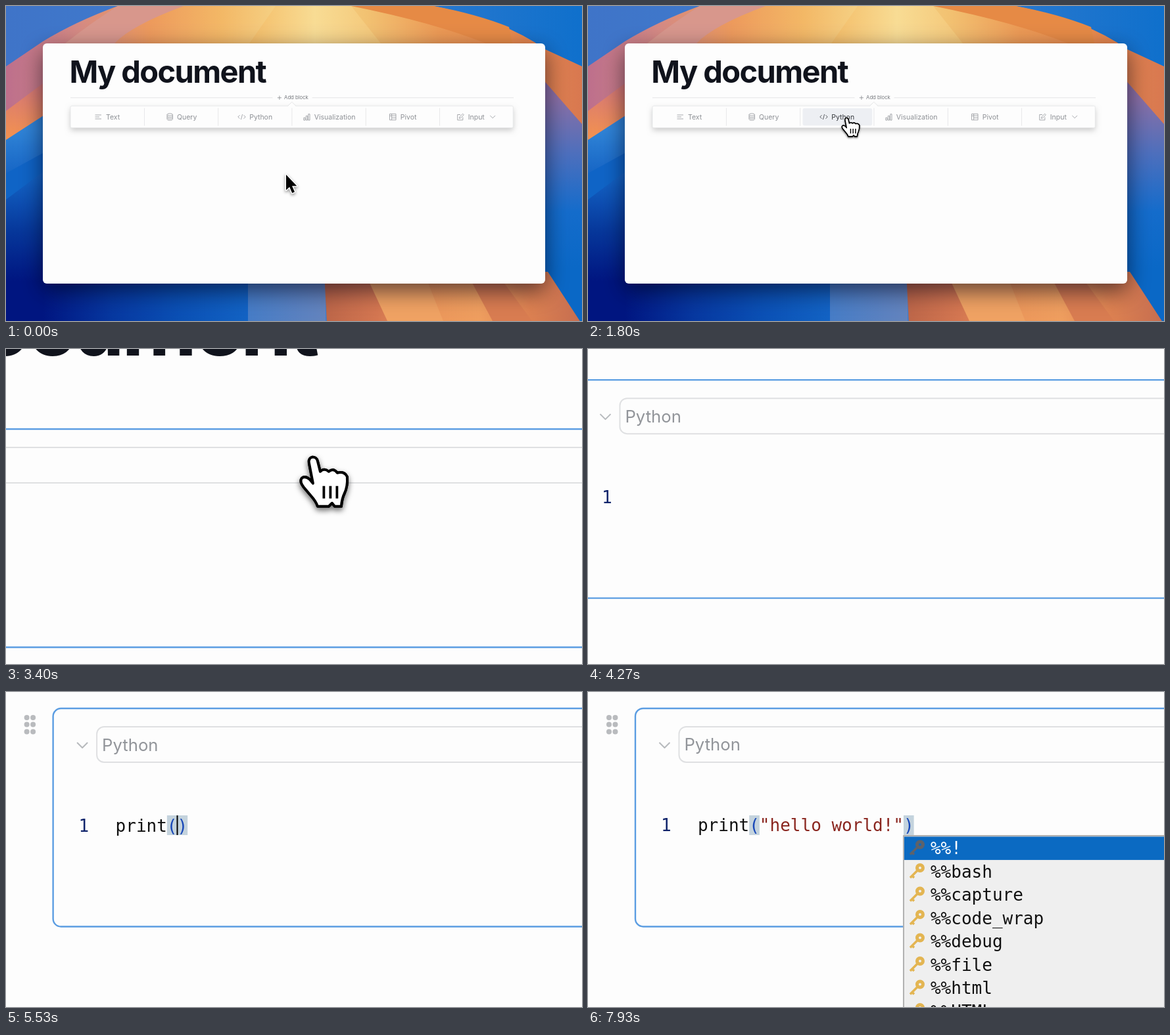
Recreate the animation shown at these times as an HTML page with a canvas. Size 876 by 480 pixels, loop 8 s.

```html
<!DOCTYPE html>
<html lang="en">
<head>
<meta charset="utf-8">
<title>Document editor</title>
<style>
  html, body { margin: 0; width: 100%; height: 100%; overflow: hidden; }
  canvas { display: block; width: 876px; height: 480px; }
</style>
</head>
<body>
<canvas id="stage" width="876" height="480"></canvas>
<script>
const ctx = document.getElementById('stage').getContext('2d');
const LOOP = 8000, ZOOM = 2.67;
const SANS = 'Inter, sans-serif', MONO = '"DejaVu Sans Mono", monospace';
const CHAR = 15.65, CODE_X = 95;

// ---------- timing ----------
const CLICK = 2270, INSERT = 2520;
const KEYS = [...'print("hello world!"'];
const KEY_TIMES = [4560, 4700, 4950, 5090, 5240, 5420, 5600];
for (let i = 0; i < 9; i++) KEY_TIMES.push(5705 + i * 105);
KEY_TIMES.push(6720, 6860, 7140, 7400);
const MAGIC_POPUP = 7640;

const clamp = v => Math.max(0, Math.min(1, v));
const mix = (a, b, p) => a + (b - a) * p;
const smooth = (t, a, b) => { const p = clamp((t - a) / (b - a)); return p * p * (3 - 2 * p); };
const spring = (t, start, rate) => {
  const x = Math.max(0, t - start) / 1000 * rate;
  return 1 - (1 + x) * Math.exp(-x);
};

function camera(t) {
  const moves = [
    [1800, 12.5, [ZOOM, -595, -288]],
    [2400, 8, [ZOOM, -583, -301]],
    [3730, 5.2, [ZOOM, -189.7, -398]],
  ];
  return moves.reduce((pose, [start, rate, to]) =>
    pose.map((v, i) => mix(v, to[i], spring(t, start, rate))), [1, 0, 0]);
}

// ---------- drawing helpers ----------
function text(str, x, y, font, color, spacing = 0) {
  ctx.font = font;
  ctx.fillStyle = color;
  ctx.letterSpacing = spacing + 'px';
  ctx.fillText(str, x, y);
}
function rect(x, y, w, h, color) {
  ctx.fillStyle = color;
  ctx.fillRect(x, y, w, h);
}
function rounded(x, y, w, h, r, fill, stroke, width = 1) {
  ctx.beginPath();
  ctx.roundRect(x, y, w, h, r);
  if (fill) { ctx.fillStyle = fill; ctx.fill(); }
  if (stroke) { ctx.strokeStyle = stroke; ctx.lineWidth = width; ctx.stroke(); }
}
function line(path, color, width = 1) {
  ctx.strokeStyle = color;
  ctx.lineWidth = width;
  ctx.stroke(new Path2D(path));
}
function shape(path, fill) {
  ctx.fillStyle = fill;
  ctx.fill(new Path2D(path));
}
function gradient(x0, y0, x1, y1, ...colors) {
  const g = ctx.createLinearGradient(x0, y0, x1, y1);
  colors.forEach((c, i) => g.addColorStop(i / (colors.length - 1), c));
  return g;
}
function shadow(color, blur, y, scale) {
  ctx.shadowColor = color;
  ctx.shadowBlur = blur * scale;
  ctx.shadowOffsetY = y * scale;
}
function at(x, y, scale, draw) {
  ctx.save();
  ctx.translate(x, y);
  ctx.scale(scale, scale);
  draw();
  ctx.restore();
}

// ---------- scene ----------
function wallpaper() {
  rect(0, 0, 876, 480, gradient(0, 0, 876, 0, '#3f74c8', '#3f7fd0', '#0f70cc'));
  // sunlit ridge across the top
  shape('M0 92 L56 54 Q105 24 170 0 H650 Q760 22 820 66 L876 92 V300 H0Z',
    gradient(0, 0, 876, 0, '#bd6f8c', '#d58a83', '#ed9a5c', '#f3b866', '#f6d88d', '#f2c272', '#ec9a55', '#e98a4c', '#d87850'));
  shape('M90 57 Q130 25 170 0 H270 Q190 30 165 57Z', '#d8978c');
  shape('M410 0 H525 L570 57 H370Z', gradient(370, 0, 570, 0, '#f4bd68', '#f8dc94', '#f4c677'));
  shape('M525 0 H650 Q715 12 765 32 L770 57 H730 Q650 25 525 0Z', '#e68a45');
  // left rays
  shape('M0 160 L56 118 V185 L0 205Z', gradient(0, 120, 0, 200, '#d67876', '#f29150'));
  shape('M0 204 L60 165 V480 H0Z', gradient(0, 190, 0, 420, '#2f83d6', '#1260c2', '#06379a', '#001580'));
  shape('M0 255 L60 222 V250 L0 295Z', '#0f64c6');
  // right rays
  shape('M815 110 L876 180 V480 H815Z', gradient(0, 140, 0, 400, '#8b6fa4', '#4c6fbd', '#146ccb', '#0a68c6'));
  // foreground
  rect(56, 415, 314, 65, gradient(56, 0, 370, 0, '#001580', '#06379f', '#0a50b4', '#1263c4'));
  rect(368, 415, 118, 65, gradient(368, 0, 486, 0, '#467cc6', '#6484bd'));
  shape('M484 405 H824 L876 485 H488Z', gradient(486, 0, 876, 0, '#bd6648', '#d47650', '#ec9659', '#ef9e5e', '#dc8050', '#c56d50'));
  shape('M545 405 H635 L665 480 H580Z', '#f0a262');
  shape('M700 405 H745 L800 480 H740Z', '#d97c50');
}

function icons(hover) {
  const gray = '#92959a', w = 0.8;
  line('M135.5 166 H145 M135.5 169 H142 M135.5 172 H145', gray, w);
  line('M245 165.5 a4.2 1.7 0 0 1 8.4 0 a4.2 1.7 0 0 1 -8.4 0 V172.5 a4.2 1.7 0 0 0 8.4 0 V165.5 M245 168 a4.2 1.7 0 0 0 8.4 0 M245 170.3 a4.2 1.7 0 0 0 8.4 0', gray, w);
  line('M355.5 166.3 L352.8 169 L355.5 171.7 M361.5 166.3 L364.2 169 L361.5 171.7 M359.6 165 L357.4 173', hover ? '#34373c' : gray, w);
  line('M452.8 170.3 h2.2 v3.7 h-2.2z M456.3 167.5 h2.2 v6.5 h-2.2z M459.8 164.7 h2.2 v9.3 h-2.2z', gray, w);
  line('M583.5 164.5 h9.5 v9.2 h-9.5z M583.5 167.3 h9.5 M586.6 164.5 v9.2 M586.6 170.5 h6.4', gray, w);
  line('M691 165.5 H686.7 V173.8 H694.8 V169.5 M689.3 171.3 L690 168.8 L694.7 164.2 L696.3 165.8 L691.7 170.5Z', gray, w);
  line('M736.3 167 L740.2 170.8 L744.1 167', gray, w);
}

function toolbar(hover, scale) {
  line('M98 139.8 H405.5 M465.5 139.8 H772', '#e2e3e4', 0.9);
  line('M412.8 139.8 H419 M415.9 136.7 V142.9', '#777a7f', 0.7);
  text('Add block', 423.1, 142.3, '7.7px ' + SANS, '#777a7f');
  ctx.save();
  shadow('rgba(0,0,0,.2)', 9, 4, scale);
  rounded(98, 152.3, 673.3, 33.3, 2, '#fdfdfd');
  ctx.restore();
  rounded(98, 152.3, 673.3, 33.3, 2, '#fdfdfd', '#e4e5e6', 0.8);
  shape('M428.5 153 L434.8 146.5 L441 153Z', '#fdfdfd');
  line('M428.5 152.3 L434.8 146.3 L441 152.3', '#e0e1e2', 0.8);
  line('M210.5 155.5 V182.5 M322.7 155.5 V182.5 M434.9 155.5 V182.5 M547.3 155.5 V182.5 M659.5 155.5 V182.5', '#e2e3e5', 0.8);
  if (hover) rounded(326.5, 155.7, 105.7, 26.5, 3, '#edeff3');
  const labels = { Text: 152, Query: 260, Python: 370.2, Visualization: 468.7, Pivot: 599.8, Input: 702.7 };
  for (const [label, x] of Object.entries(labels))
    text(label, x, 172.6, '10.5px ' + SANS, hover && label === 'Python' ? '#34373c' : '#8d9095');
  icons(hover);
}

function keyIcon(x, y, color) {
  ctx.strokeStyle = color;
  ctx.lineWidth = 5;
  ctx.beginPath();
  ctx.arc(x + 16, y - 15, 4.5, 0, 7);
  ctx.stroke();
  line(`M${x + 12} ${y - 11} L${x + 1} ${y} M${x + 4} ${y - 3} l3 3`, color, 3.5);
}

function popup(col, items, query) {
  const x = CODE_X + col * CHAR, y = 194, row = 35.5, height = items.length * row + 3;
  rounded(x, y, 545, height, 0, '#efefef', '#b0b0b0', 2);
  items.forEach((item, i) => {
    const top = y + 1.5 + i * row, base = top + 27, chosen = i === 0;
    if (chosen) rect(x + 1, top, 543, row, '#0b6ac2');
    const color = chosen ? '#fff' : '#111';
    if (!query) {
      keyIcon(x + 9, base, chosen ? '#5d626b' : '#e3b552');
    } else if (/Error|Warning/.test(item)) {
      text('t', x + 13, base, 'italic 22px "Noto Serif", serif', '#777');
    } else {
      text('ƒ', x + 10, base, '25px ' + MONO, chosen ? '#9cc3e8' : '#666');
    }
    text(item, x + 41, base, '26px ' + MONO, color);
    if (query) {
      const start = item.toLowerCase().indexOf(query);
      rect(x + 41 + start * CHAR, base + 3, query.length * CHAR, 2, color);
    }
  });
}

function code(t) {
  const count = KEY_TIMES.filter(k => k <= t).length;
  const lastKey = count ? KEY_TIMES[count - 1] : INSERT;
  const closed = count >= 6;
  const openString = count > 6 && count < 20;
  const cell = i => CODE_X + i * CHAR;
  const put = (str, col, color) => text(str, cell(col), 187.5, '26px ' + MONO, color);

  text('1', 39, 187.5, '26px ' + MONO, '#10246b');
  if (closed) {
    if (!openString) rect(cell(5), 163, CHAR, 30, '#c4d3dd');
    rect(cell(count), 163, CHAR, 30, openString ? '#f4c6c5' : '#c4d3dd');
  }
  put(KEYS.slice(0, Math.min(count, 5)).join(''), 0, '#111');
  if (closed) {
    put('(', 5, '#1747b8');
    put(KEYS.slice(6, count).join(''), 6, '#8a261f');
    put(')', count, openString ? '#a8302a' : '#1747b8');
  }
  if ((t - lastKey) % 1000 < 500) rect(cell(count) - 1, 163, 2, 30, '#000');

  if (count === 2) {
    popup(0, ['print', 'property', 'ProcessLookupError', 'repr', 'DeprecationWarning',
      'PendingDeprecationWarning', 'ChildProcessError'], 'pr');
  } else if (count > 2 && count < 6) {
    popup(0, ['print'], 'print'.slice(0, count));
  } else if (t >= MAGIC_POPUP) {
    popup(20, ['!', 'bash', 'capture', 'code_wrap', 'debug', 'file', 'html', 'HTML',
      'javascript', 'js', 'latex', 'markdown'].map(name => '%%' + name));
  }
}

function block(t) {
  for (const x of [-40, -30.5]) for (const y of [14, 24.5, 35.5]) {
    ctx.beginPath();
    ctx.arc(x, y, 4, 0, 7);
    ctx.fillStyle = '#b9bbbe';
    ctx.fill();
  }
  rounded(0, 0, 1798, 332.5, 12, null, '#5b9de2', 2.4);
  line('M36.5 52 L44.5 60 L52.5 52', '#b7babd', 2);
  rounded(66.5, 28, 1700, 54, 11, null, '#dfe0e2', 2);
  text('Python', 74.5, 64.5, '25.7px ' + SANS, '#92959a');
  code(t);
}

function cursor(t, scale) {
  const move = smooth(t, 450, 1350);
  const overButton = move > 0.86;
  const x = mix(426, 393.6, move), y = mix(257, 171, move) + 3.8 * smooth(t, 2450, 2900);
  ctx.globalAlpha = 1 - smooth(t, 3750, 3950);
  ctx.lineJoin = 'round';
  if (overButton) {
    const press = smooth(t, CLICK - 100, CLICK) - smooth(t, CLICK + 110, CLICK + 230);
    const size = (1 - 0.09 * press) / ZOOM;
    at(x, y, size, () => {
      const hand = 'M-7 8 C-9 -3 4 -4 6 5 L10 21 Q16 15 23 21 Q30 15 36 23 Q47 20 51 29 Q52 43 47 54 Q43 62 42 74 H32 L28 69 L23 74 H6 Q4 67 -4 58 L-15 45 Q-22 36 -18 31 Q-13 27 -6 33 L-1 39Z';
      shadow('rgba(0,0,0,.5)', 8, 4, scale * size);
      line(hand, '#000', 4);
      shape(hand, '#fff');
      ctx.shadowColor = 'transparent';
      line(hand, '#000', 4);
      line('M15.5 43 V62 M25.5 43 V62 M35.5 43 V62', '#000', 3.8);
    });
  } else {
    at(x, y, 1, () => {
      const arrow = 'M0 0 V23.5 L5.2 18.7 L9.2 28 L13 26.3 L9 17.3 H16.3Z';
      shadow('rgba(0,0,0,.45)', 4, 2, scale);
      line(arrow, '#fff', 3);
      ctx.shadowColor = 'transparent';
      shape(arrow, '#000');
    });
  }
  ctx.globalAlpha = 1;
}

function render(t) {
  const [scale, tx, ty] = camera(t);
  ctx.setTransform(scale, 0, 0, scale, tx, ty);
  wallpaper();
  ctx.save();
  shadow('rgba(0,0,20,.6)', 34, 11, scale);
  rounded(56, 57, 764, 366, 6, '#fdfdfd');
  ctx.restore();
  text('My document', 96.4, 116.6, '700 47px ' + SANS, '#10131c', -1.6);
  if (t < INSERT) toolbar(t > 1220, scale);
  else at(98, 158.4, 1 / ZOOM, () => block(t));
  cursor(t, scale);
}

function frame(now) {
  render(now % LOOP);
  requestAnimationFrame(frame);
}
requestAnimationFrame(frame);
</script>
</body>
</html>
```
